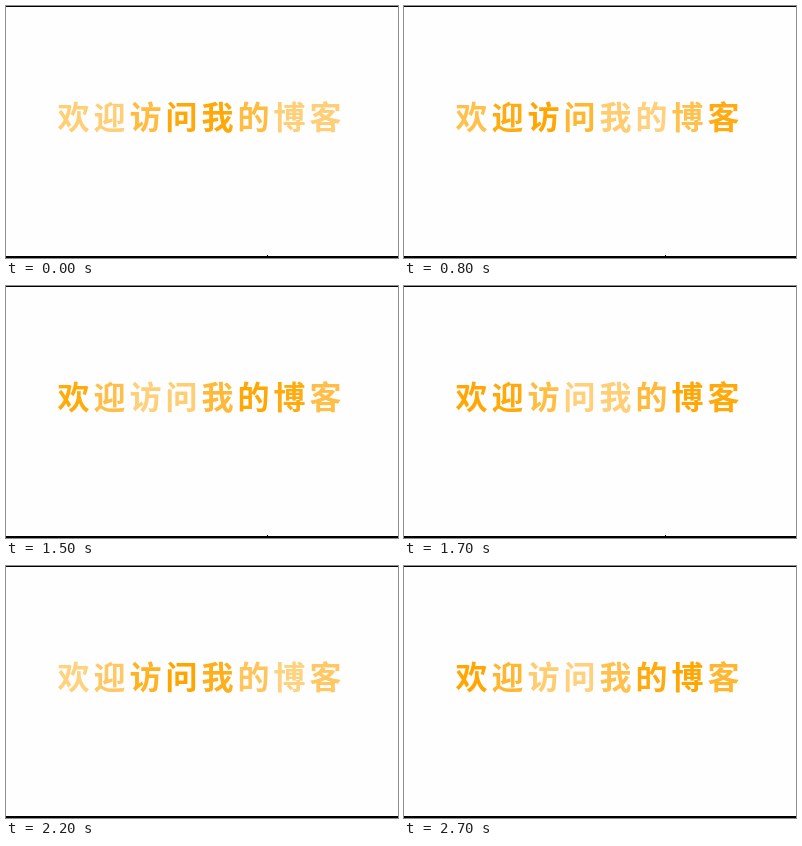
An HTML page with a canvas that plays this animation: 392 px wide and 252 px high, repeating every 2.8 s.

```html
<!DOCTYPE html>
<html lang="zh-CN">
<head>
<meta charset="utf-8">
<style>
  html, body { margin: 0; width: 100%; height: 100%; overflow: hidden; background: #fefefe; }
  canvas { display: block; }
</style>
</head>
<body>
<canvas id="stage" width="392" height="252"></canvas>
<script>
const ctx = document.getElementById('stage').getContext('2d');
const LETTERS = [...'欢迎访问我的博客'];
const LOOP = 2800, STEP = 100;
const LEFT = 51.5, PITCH = 36, BASELINE = 123;
const WAVE_LENGTH = 6;    // letters
const WAVE_SPEED = 0.526; // letters per step
const WAVE_START = 3.5;

// Opacity of a letter as the bright crest travels to the right.
function glow(index, step) {
  const distance = index - WAVE_START - WAVE_SPEED * step;
  return 0.75 + 0.25 * Math.cos(2 * Math.PI * distance / WAVE_LENGTH);
}

function tickVisible(step) {
  return step === 0 || (step + 11) % 13 < 7;
}

function draw(time) {
  const step = Math.floor((time % LOOP) / STEP);
  ctx.fillStyle = '#fefefe';
  ctx.fillRect(0, 0, 392, 252);

  ctx.fillStyle = '#000';
  ctx.fillRect(0, 0, 392, 1);
  ctx.fillRect(0, 250, 392, 2);
  if (tickVisible(step)) ctx.fillRect(261, 249, 1, 1);

  ctx.font = 'bold 32px "Noto Sans CJK SC", "Noto Sans CJK", sans-serif';
  ctx.fillStyle = '#ffa500';
  LETTERS.forEach((letter, i) => {
    ctx.globalAlpha = glow(i, step);
    ctx.fillText(letter, LEFT + i * PITCH, BASELINE);
  });
  ctx.globalAlpha = 1;
}

const start = performance.now();
function tick() {
  draw(performance.now() - start);
  requestAnimationFrame(tick);
}
tick();
</script>
</body>
</html>
```
